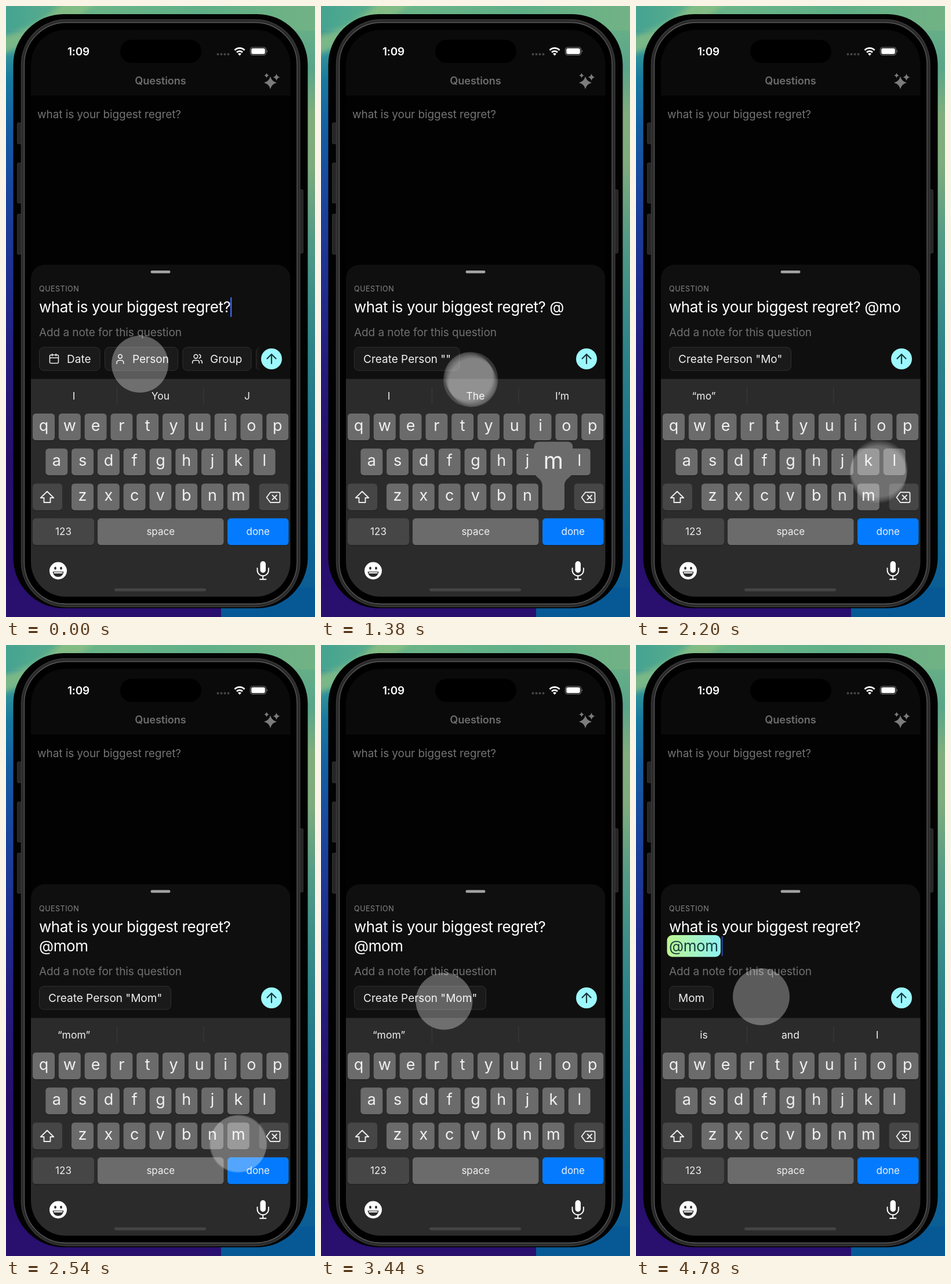
Recreate the animation shown at these times as an HTML page. Size 533x1051 px, loop 4.84 s.

```html
<!DOCTYPE html>
<html lang="en">
<head>
<meta charset="utf-8">
<title>Question sheet</title>
<style>
html, body { margin: 0; width: 100%; height: 100%; overflow: hidden; background: #000; }
svg { display: block; width: 100vw; height: 100vh; }
text { font-family: Inter, "Liberation Sans", sans-serif; white-space: pre; }
.body { font-size: 19.1px; letter-spacing: -.12px; }
.big { font-size: 26px; letter-spacing: -.42px; fill: #fff; }
.chip { font-size: 19px; fill: #f0f0f0; }
.small { font-size: 17px; fill: #f0f0f0; text-anchor: middle; }
.key { font-size: 27px; fill: #f0f0f0; text-anchor: middle; }
.line { fill: none; stroke: #ececec; stroke-width: 1.9; stroke-linecap: round; stroke-linejoin: round; }
.box { fill: #1a1a1a; stroke: #303030; }
</style>
</head>
<body>
<svg viewBox="0 0 533 1051" preserveAspectRatio="none">
  <defs>
    <linearGradient id="left" x2="0" y2="1">
      <stop offset="0" stop-color="#45a292"/><stop offset=".07" stop-color="#379798"/>
      <stop offset=".12" stop-color="#187a9f"/><stop offset=".2" stop-color="#145ea4"/>
      <stop offset=".3" stop-color="#19479f"/><stop offset=".42" stop-color="#1e3394"/>
      <stop offset=".58" stop-color="#241c7e"/>
      <stop offset=".75" stop-color="#270e6b"/><stop offset="1" stop-color="#290f6e"/>
    </linearGradient>
    <linearGradient id="right" x2="0" y2="1">
      <stop offset="0" stop-color="#6fb485"/><stop offset=".1" stop-color="#58a58a"/>
      <stop offset=".18" stop-color="#82ae7d"/><stop offset=".26" stop-color="#7fac7e"/>
      <stop offset=".38" stop-color="#529b86"/><stop offset=".55" stop-color="#2f8589"/>
      <stop offset=".78" stop-color="#156c8d"/><stop offset="1" stop-color="#085a96"/>
    </linearGradient>
    <linearGradient id="top">
      <stop offset="0" stop-color="#45a391"/><stop offset=".3" stop-color="#6ab588"/>
      <stop offset=".65" stop-color="#5fb088"/><stop offset="1" stop-color="#72b284"/>
    </linearGradient>
    <linearGradient id="tagFill">
      <stop offset="0" stop-color="#bdf58f"/><stop offset="1" stop-color="#8ff2f4"/>
    </linearGradient>
    <linearGradient id="fade">
      <stop offset="0" stop-color="#0f0f0f" stop-opacity="0"/><stop offset="1" stop-color="#0f0f0f"/>
    </linearGradient>
    <clipPath id="screen"><rect x="43" y="41" width="447.500" height="975" rx="60"/></clipPath>
    <filter id="soft"><feGaussianBlur stdDeviation="5"/></filter>
  </defs>

  <rect width="300" height="1051" fill="url(#left)"/>
  <rect x="266" width="267" height="1051" fill="url(#right)"/>
  <rect width="533" height="42" fill="url(#top)"/>
  <path d="M-10 52Q60 38 100-10H160Q90 55-10 84Z" fill="#8cc084" opacity=".8" filter="url(#soft)"/>
  <rect y="1000" width="371" height="51" fill="#290f6e"/>
  <rect x="371" y="1000" width="162" height="51" fill="#075996"/>

  <rect x="12.500" y="14" width="508" height="1022" rx="87" fill="#020202"/>
  <g fill="#262626" stroke="#3a3a3a" stroke-width=".8">
    <rect x="19.500" y="201" width="7" height="36" rx="1.500"/><rect x="19.500" y="270" width="7" height="69" rx="1.500"/>
    <rect x="19.500" y="358" width="7" height="69" rx="1.500"/><rect x="506.500" y="316" width="6" height="109" rx="1.500"/>
  </g>
  <rect x="26.500" y="23.500" width="480.500" height="1010" rx="77" fill="#2a2a2a" stroke="#3a3a3a" stroke-width="1.400"/>
  <rect x="31.500" y="28.500" width="470.500" height="1000" rx="72" fill="#000" stroke="#5a5a5a" stroke-width="1.300"/>

  <g clip-path="url(#screen)">
    <rect x="43" y="41" width="448" height="975" fill="#020202"/>
    <rect x="43" y="41" width="448" height="113" fill="#0a0a0a"/>
    <rect x="197" y="58" width="140" height="40" rx="20" fill="#000"/>
    <text x="106" y="85" font-size="19" font-weight="600" letter-spacing="-.2" fill="#fff">1:09</text>
    <g fill="#464646"><circle cx="365.500" cy="83" r="2"/><circle cx="371.500" cy="83" r="2"/><circle cx="377.500" cy="83" r="2"/><circle cx="383.500" cy="83" r="2"/></g>
    <path d="M394.500 76a12 12 0 0 1 17 0M398 79.700a7.300 7.300 0 0 1 10 0" fill="none" stroke="#fff" stroke-width="2.800"/>
    <path d="M400 82.300a4.500 4.500 0 0 1 6 0L403 85.500Z" fill="#fff"/>
    <rect x="421.500" y="71" width="27" height="13.500" rx="4.200" fill="none" stroke="#777" stroke-width="1.200"/>
    <rect x="423.200" y="72.700" width="23.600" height="10.100" rx="2.700" fill="#fff"/>
    <path d="M450 75.500q2.400 2.300 0 4.600Z" fill="#777"/>
    <text x="266.500" y="135" font-size="18.200" font-weight="600" letter-spacing="-.1" text-anchor="middle" fill="#6c6c6c">Questions</text>
    <g id="stars" fill="#7c7c7c"></g>
    <text x="54" y="193" class="body" fill="#737373">what is your biggest regret?</text>

    <g id="sheet">
      <rect x="43" y="445" width="447.500" height="300" rx="24" fill="#0f0f0f"/>
      <rect x="249.500" y="455" width="34" height="4.800" rx="2.400" fill="#a2a2a2"/>
      <text x="57" y="491" font-size="12.600" letter-spacing=".5" fill="#858585">QUESTION</text>
      <text id="line1" x="57" y="527" class="big"></text>
    </g>
    <rect id="tag" x="53.500" y="499" width="92.500" height="37.500" rx="9" fill="url(#tagFill)"/>
    <text id="line2" x="57" y="527" class="big"></text>
    <rect id="caret" y="501" width="2.300" height="34" rx="1" fill="#3f67f0"/>
    <text x="57" y="567.500" class="body" fill="#707070">Add a note for this question</text>

    <g id="tools">
      <rect x="57.500" y="587" width="104.500" height="40" rx="7.500" class="box"/>
      <rect x="170.500" y="587" width="126" height="40" rx="7.500" class="box"/>
      <rect x="305" y="587" width="118" height="40" rx="7.500" class="box"/>
      <rect x="431.500" y="587" width="60" height="40" rx="7.500" class="box"/>
      <rect x="431" y="585" width="9" height="44" fill="url(#fade)"/>
      <rect x="440" y="585" width="50" height="44" fill="#0f0f0f"/>
      <g class="line">
        <path transform="translate(73 597) scale(.83)" d="M5 4h14a2 2 0 0 1 2 2v13a2 2 0 0 1-2 2H5a2 2 0 0 1-2-2V6a2 2 0 0 1 2-2ZM3 10h18M8 2v4M16 2v4"/>
        <path transform="translate(187 597) scale(.83)" d="M19 22v-2a5 5 0 0 0-5-5h-4a5 5 0 0 0-5 5v2M8 7a4 4 0 1 0 8 0a4 4 0 1 0-8 0"/>
        <path transform="translate(320 597) scale(.83)" d="M16 21v-2a4 4 0 0 0-4-4H6a4 4 0 0 0-4 4v2M5 7a4 4 0 1 0 8 0a4 4 0 1 0-8 0M22 21v-2a4 4 0 0 0-3-3.870M16 3.130a4 4 0 0 1 0 7.750"/>
      </g>
      <text x="105" y="614" class="chip">Date</text>
      <text x="218" y="614" class="chip">Person</text>
      <text x="352" y="614" class="chip">Group</text>
    </g>
    <g id="person">
      <rect id="personBox" x="57.500" y="587" height="40" rx="7.500" class="box"/>
      <text id="personText" x="73" y="614" class="chip"></text>
    </g>
    <circle cx="458" cy="607" r="18" fill="#9df8fd"/>
    <path d="M458 615V599.500M450.500 606.500L458 599L465.500 606.500" class="line" style="stroke:#16393c;stroke-width:2.200"/>

    <rect x="43" y="641.500" width="448" height="375" fill="#2b2b2b"/>
    <path d="M191.500 656v28M341 656v28" stroke="#3c3c3c"/>
    <g id="hints"></g>
    <g id="keys"></g>
    <path d="M71 835L82.200 846H76.500V854H65.500V846H59.800Z" class="line"/>
    <path d="M456 836.500H470.500a2 2 0 0 1 2 2V852a2 2 0 0 1-2 2H456L449.500 845.200ZM459.500 841.500L467 849M467 841.500L459.500 849" class="line"/>
    <circle cx="90" cy="971.500" r="15" fill="#fff"/>
    <g fill="#2b2b2b"><ellipse cx="85" cy="967" rx="1.900" ry="2.600"/><ellipse cx="95" cy="967" rx="1.900" ry="2.600"/><path d="M80.500 973H99.500Q98 982 90 982T80.500 973Z"/></g>
    <path d="M82.500 975H97.500" stroke="#fff" stroke-width="2"/>
    <rect x="438.500" y="955" width="9.500" height="20" rx="4.750" fill="#fff"/>
    <path d="M433.500 967v3.500a9.700 9.700 0 0 0 19.400 0V967M443.200 980.500V986M438 986.200H448.500" class="line" style="stroke:#fff"/>
    <rect x="187" y="1001.800" width="158" height="5" rx="2.500" fill="#444"/>
    <g id="pop"><path fill="#6b6b6b"/><text class="key" style="font-size:39px"></text></g>
  </g>
  <circle id="ripple" fill="#fff"/>
  <g id="touch" fill="#fff"></g>
</svg>
<script>
const LOOP = 4840;
const $ = id => document.getElementById(id);
const make = (parent, tag, attrs, text = '') => {
  const el = document.createElementNS('http://www.w3.org/2000/svg', tag);
  for (const k in attrs) el.setAttribute(k, attrs[k]);
  el.textContent = text;
  parent.append(el);
  return el;
};
const set = (el, attrs) => { for (const k in attrs) el.setAttribute(k, attrs[k]); };
const show = (el, on) => el.setAttribute('visibility', on ? 'visible' : 'hidden');
const write = (el, s) => { if (el.textContent !== s) el.textContent = s; };
const clamp = v => Math.min(1, Math.max(0, v));
const smooth = v => { v = clamp(v); return v * v * (3 - 2 * v); };

for (const [x, y, r] of [[456, 132, 11], [466.5, 122.5, 6], [449.5, 119.5, 4.5]]) {
  const k = r * .2;
  make($('stars'), 'path', { d: `M${x} ${y - r}Q${x + k} ${y - k} ${x + r} ${y}Q${x + k} ${y + k} ${x} ${y + r}Q${x - k} ${y + k} ${x - r} ${y}Q${x - k} ${y - k} ${x} ${y - r}Z` });
}

// Keyboard
function addKey(x, y, w, fill, label, cls, base) {
  make($('keys'), 'rect', { x, y: y + 1.2, width: w, height: 46, rx: 5.5, fill: '#1c1c1c' });
  make($('keys'), 'rect', { x, y, width: w, height: 46, rx: 5.5, fill });
  if (label) make($('keys'), 'text', { x: x + w / 2, y: y + base, class: cls }, label);
}
const spots = {};
[['qwertyuiop', 46], ['asdfghjkl', 68.3], ['zxcvbnm', 113]].forEach(([row, x0], r) =>
  [...row].forEach((c, i) => {
    const x = x0 + i * 44.8, y = 701 + r * 60.2;
    addKey(x, y, 38, '#6b6b6b', c, 'key', 29.5);
    spots[c] = [x + 19, y];
  }));
addKey(46, 821.4, 51, '#464646');
addKey(436.5, 821.4, 51, '#464646');
addKey(46, 881.3, 106, '#464646', '123', 'small', 29);
addKey(158, 881.3, 217.5, '#6b6b6b', 'space', 'small', 28.5);
addKey(382, 881.3, 105.5, '#047bfe', 'done', 'small', 28.5);

const hints = [117, 266.5, 416].map(x => make($('hints'), 'text', { x, y: 677, class: 'small', style: 'font-size:17.5px' }));

// Typing: start, mention, hints, chip label, chip width, caret x (0 hides it)
const steps = [
  [0, '', ['I', 'You', 'J'], '', 0, 387],
  [860, ' @', ['I', 'The', 'I’m'], 'Create Person ""', 181.5, 421],
  [1440, ' @m', ['“m”', '', ''], 'Create Person "M"', 198.5, 444],
  [1800, ' @mo', ['“mo”', '', ''], 'Create Person "Mo"', 210, 0],
  [2340, '@mom', ['“mom”', '', ''], 'Create Person "Mom"', 227, 141.5],
  [4240, '@mom', ['is', 'and', 'I'], 'Mom', 76, 147.5]
];
const presses = [['m', 1330, 1440], ['o', 1700, 1800], ['m', 2220, 2340]];

// Pointer stops: time, x, y. It trails behind the key presses.
const route = [
  [0, 231, 616], [400, 231, 616], [600, 233, 607], [1298, 233, 607], [1638, 401, 844],
  [1700, 401, 844], [1900, 430, 722], [2071, 430, 722], [2291, 412, 846], [2420, 412, 846],
  [2724, 380, 880], [3130, 212, 614], [3300, 212, 614], [3900, 215, 605], [LOOP, 216, 605]
];
const taps = [[580, 780], ...presses.map(p => p.slice(1)), [3980, 4240]];

function pointAt(t) {
  t = Math.max(0, t);
  const i = Math.max(1, route.findIndex(p => p[0] > t));
  const [t0, x0, y0] = route[i - 1], [t1, x1, y1] = route[i];
  const k = smooth((t - t0) / (t1 - t0));
  return [x0 + (x1 - x0) * k, y0 + (y1 - y0) * k];
}

const ghosts = Array.from({ length: 8 }, () => make($('touch'), 'circle', {}));

function drawTouch(t) {
  let r = 49, ring = 0;
  for (const [down, up] of taps) {
    r -= 10 * (smooth((t - down) / 80) - smooth((t - up) / 140));
    const k = (t - down - 20) / 160;
    if (k > 0 && k < 1) ring = k;
  }
  ghosts.forEach((g, i) => {
    const [cx, cy] = pointAt(t - i * 2 + 7);
    set(g, { cx, cy, r, opacity: .048 + (49 - r) * .0014 });
  });
  const [cx, cy] = pointAt(t);
  set($('ripple'), { cx, cy, r: 36 + 58 * ring, opacity: .26 * (1 - ring) * clamp(ring * 4) });
}

function drawPop(t) {
  const hit = presses.find(p => t >= p[1] && t < p[2]);
  show($('pop'), hit);
  if (!hit) return;
  const [x, y] = spots[hit[0]], [shape, label] = $('pop').children;
  set(shape, { d: `M${x - 24} ${y - 72}h48q9.500 0 9.500 9.500v39c0 15-14.500 12-14.500 28v35q0 6-6 6h-26q-6 0-6-6v-35c0-16-14.500-13-14.500-28v-39q0-9.500 9.500-9.500Z` });
  set(label, { x, y: y - 25 });
  write(label, hit[0]);
}

function draw(t) {
  const [, mention, words, chip, width, caretX] = steps.filter(s => s[0] <= t).pop();
  const wrapped = t >= 2340, tagged = t >= 4240;
  const rise = 33.5 * smooth((t - 2340) / 200);
  set($('sheet'), { transform: `translate(0 ${-rise})` });
  write($('line1'), 'what is your biggest regret?' + (wrapped ? '' : mention));
  write($('line2'), wrapped ? mention : '');
  $('line2').style.fill = tagged ? '#163f42' : '#fff';
  show($('tag'), tagged);
  words.forEach((w, i) => write(hints[i], w));
  show($('tools'), !chip);
  show($('person'), chip);
  write($('personText'), chip);
  set($('personBox'), { width });
  const beat = t % 1000;
  const lit = 1 - smooth((beat - 260) / 80) + smooth((beat - 730) / 90);
  set($('caret'), { x: caretX, opacity: caretX ? lit : 0 });
  drawPop(t);
  drawTouch(t);
}

const start = performance.now();
function tick() {
  draw((performance.now() - start) % LOOP);
  requestAnimationFrame(tick);
}
tick();
</script>
</body>
</html>
```
